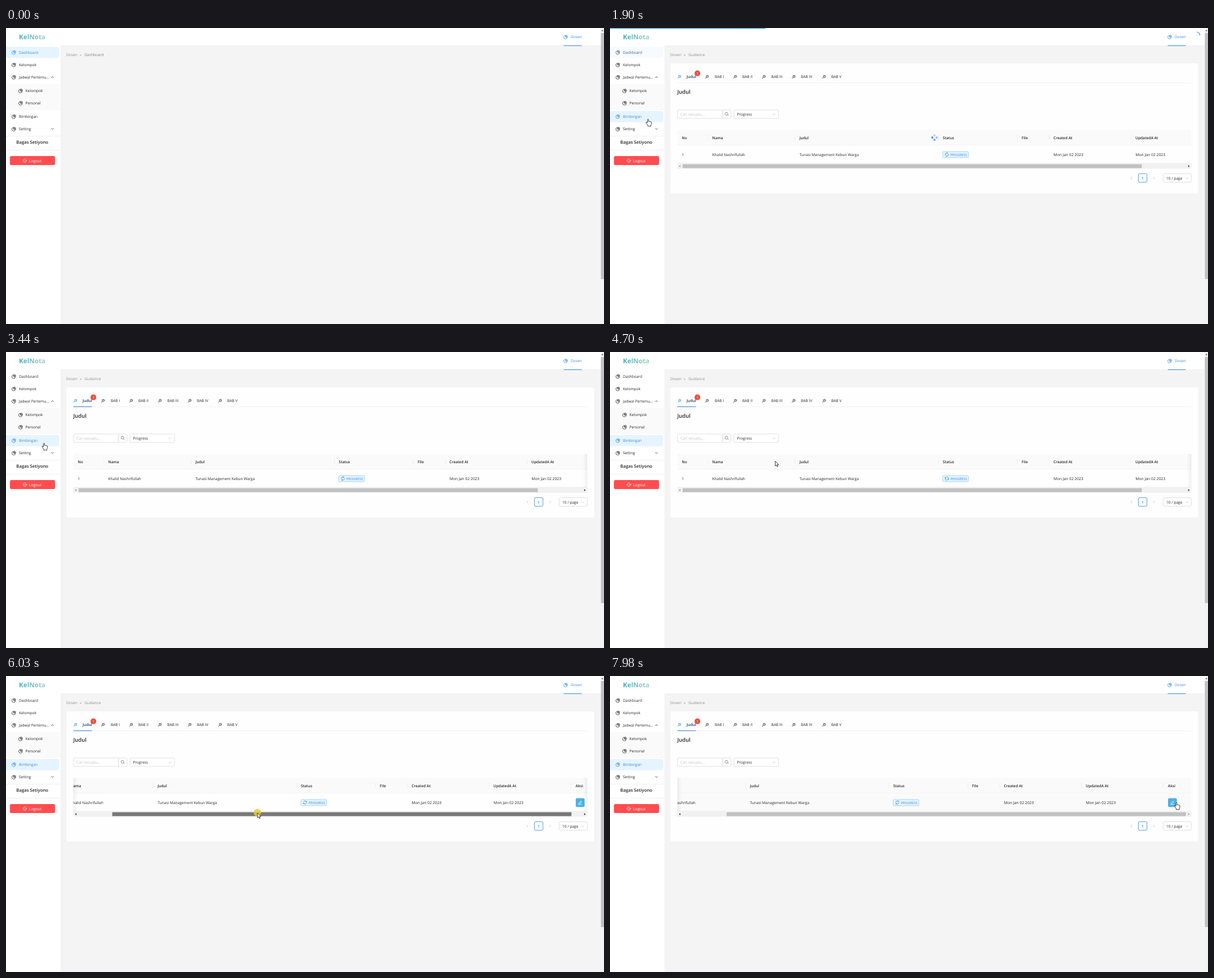
These frames come from a looping animation (1062 by 527 pixels, 8 s). An HTML page with a canvas:

```html
<!DOCTYPE html>
<html lang="id">
<head>
<meta charset="utf-8">
<title>Dashboard</title>
<style>
  html, body { margin: 0; width: 100%; height: 100%; overflow: hidden; background: #fff; }
  canvas { display: block; }
</style>
</head>
<body>
<canvas id="stage" width="1062" height="527"></canvas>
<script>
const c = document.getElementById('stage').getContext('2d');
const LOOP = 8000, MAX_SCROLL = 88, SCROLL_RATIO = 1.126, DRAG_X = 387;
const INK = '#252525', BLUE = '#2f8ae8', GREY = '#8a8e8c', EDGE = '#d9d9d9', PALE = '#e6f4ff';
const PAGE_AT = 1690, TABLE_AT = 1760, DRAG_AT = 5380, DROP_AT = 6430;

// Pointer stops: time, x, y
const stops = [
  [520, 883, 463], [1270, 66, 172], [1340, 67.5, 162], [3900, 67.5, 162],
  [4600, 293.5, 194], [4720, 293.5, 194], [4980, 335, 149], [5290, 387, 243.5],
  [5400, 387, 243.5], [6030, 446.5, 243.5], [6160, 468, 243.5], [6410, 674, 243.5],
  [7060, 1051.5, 208.5], [7120, 1051.5, 208.5], [7250, 1057, 209], [7450, 1057, 213],
  [7850, 1006, 225], [8000, 1006, 225]
];
const arrowShape = new Path2D('M0 0V8.6L2 6.8L3.4 10L4.8 9.4L3.4 6.4H6Z');
const handShape = new Path2D('M0 0c-1 0-1 1-1 1.5v5l-1-1c-1-1-2 0-1.3 1l2.8 4.5v1.5h5.5v-1.5' +
  'l1-2.5v-3c0-1-1-1.2-1.5-.7c-.3-1-1.5-1-1.8-.4c-.4-.8-1.4-.8-1.7-.2v-3c0-.7 0-1.2-1-1.2z');

const clamp = (v, a = 0, b = 1) => Math.min(b, Math.max(a, v));
const ramp = (t, a, b) => clamp((t - a) / (b - a));

function pointer(t) {
  let i = 0;
  while (i < stops.length - 2 && t >= stops[i + 1][0]) i++;
  const [t0, x0, y0] = stops[i], [t1, x1, y1] = stops[i + 1], k = ramp(t, t0, t1);
  return { x: x0 + (x1 - x0) * k, y: y0 + (y1 - y0) * k };
}

function text(s, x, y, color = INK, size = 6.6, weight = 400, align = 'left') {
  c.font = `${weight} ${size}px "Open Sans", "Noto Sans", sans-serif`;
  c.textAlign = align;
  c.fillStyle = color;
  c.fillText(s, x, y + size * .36);
}
function rect(x, y, w, h, color) {
  c.fillStyle = color;
  c.fillRect(x, y, w, h);
}
function box(x, y, w, h, r, fill, edge) {
  c.beginPath();
  c.roundRect(x, y, w, h, r);
  if (fill) { c.fillStyle = fill; c.fill(); }
  if (edge) { c.strokeStyle = edge; c.lineWidth = .8; c.stroke(); }
}
// Strokes an icon path around a centre point
function icon(x, y, d, color, width = .8, turn = 0) {
  c.save();
  c.translate(x, y);
  c.rotate(turn);
  c.strokeStyle = color;
  c.lineWidth = width;
  c.stroke(new Path2D(d));
  c.restore();
}
const pie = (x, y, color = INK) =>
  icon(x, y, 'M-.4-2.9A3.2 3.2 0 1 0 2.9.4H-.4ZM.7-3.4V-.7H3.4A2.8 2.8 0 0 0 .7-3.4Z', color);
const tool = (x, y, color) =>
  icon(x, y, 'M2.8-.8A2 2 0 1 0-1.2-.8A2 2 0 1 0 2.8-.8M-.6.6L-2.9 2.9M.4-.8H1.4', color, .9);
const lens = (x, y) =>
  icon(x, y, 'M2-.7A2.5 2.5 0 1 0-3-.7A2.5 2.5 0 1 0 2-.7M1.3 1.1L3.4 3.2', '#777');
const chevron = (x, y, dir, color = INK) =>
  icon(x, y, `M-2.2 ${-dir}L0 ${dir * 1.2}L2.2 ${-dir}`, color);
const angle = (x, y, dir) =>
  icon(x, y, `M${-dir} -2.2L${dir * 1.2} 0L${-dir} 2.2`, '#b5b5b5', .7);

function triangle(x, y, dir, color) {
  c.fillStyle = color;
  c.beginPath();
  c.moveTo(x + dir * 1.5, y);
  c.lineTo(x - dir, y - 2);
  c.lineTo(x - dir, y + 2);
  c.fill();
}

// A menu row whose selected look has strength k
function menuRow(label, y, k = 0) {
  c.globalAlpha = k;
  box(-4, y - 10, 98.5, 20, 4, PALE);
  for (const [color, alpha] of [[INK, 1 - k], [BLUE, k]]) {
    c.globalAlpha = alpha;
    pie(14, y, color);
    text(label, 23, y, color);
  }
  c.globalAlpha = 1;
}

function sidebar(t) {
  rect(0, 0, 96.5, 527, '#fff');
  const g = c.createLinearGradient(23, 0, 70, 0);
  g.addColorStop(0, '#45aab4');
  g.addColorStop(1, '#a5d3cb');
  text('KelNota', 23, 16, g, 11.7, 700);
  const open = t >= PAGE_AT;
  menuRow('Dashboard', 43.5, open ? 1 - ramp(t, PAGE_AT, 2010) : 1);
  menuRow('Kelompok', 65.7);
  menuRow('Jadwal Pertemu...', 87.7);
  chevron(82.5, 87.7, -1);
  rect(0, 99.5, 96.5, 46.5, '#fafafa');
  [['Kelompok', 112], ['Personal', 133.8]].forEach(([s, y]) => {
    pie(26, y);
    text(s, 34.5, y);
  });
  menuRow('Bimbingan', 157.7, ramp(t, PAGE_AT, 1860));
  menuRow('Setting', 180);
  chevron(82.5, 179.5, 1);
  rect(0, 192, 96.5, .8, '#ebebeb');
  rect(0, 217, 96.5, .8, '#ebebeb');
  text('Bagas Setiyono', 46.7, 203, INK, 7.75, 600, 'center');
  box(7, 228, 80, 16, 2.5, '#ff4d4f');
  icon(33.7, 236.2, 'M2-2.3A3.1 3.1 0 1 0 2 2.3M-.8 0H3.6M2.4-1.1L3.6 0L2.4 1.1', '#fff');
  text('Logout', 41, 236.2, '#fff', 6.8);
}

function pageFrame(p) {
  rect(0, 0, 1062, 527, '#fff');
  rect(96.5, 31.5, 960, 496, '#f4f4f4');
  rect(96.5, 31, 960, .7, '#eeeeee');
  pie(994, 16, BLUE);
  text('Dosen', 1003, 16, BLUE);
  rect(990.5, 31, 32, 1, BLUE);
  rect(1056, 0, 6, 527, '#f1f1f1');
  rect(1056.5, 9, 5.5, 438, p && p.x > 1055 ? '#a8a8a8' : '#c1c1c1');
  c.fillStyle = '#606060';
  c.beginPath();
  c.moveTo(1059.2, 3);
  c.lineTo(1061, 5.5);
  c.lineTo(1057.4, 5.5);
  c.fill();
}

function tabs(t) {
  rect(119.5, 97, 913, .8, '#efefef');
  tool(123, 87, BLUE);
  text('Judul', 136, 87, '#1c3b5e', 6.9, 600);
  [['I', 172, 186], ['II', 222, 235], ['III', 273, 286.5], ['IV', 326, 339], ['V', 380, 393]]
    .forEach(([n, ix, x]) => { tool(ix, 87, '#3a2c2c'); text('BAB ' + n, x, 87); });
  if (t > 1960) rect(119.5, 97, 33, 1, '#2f7fd6');
  c.fillStyle = '#e5533f';
  c.beginPath();
  c.arc(155.2, 80.7, 5.1, 0, 7);
  c.fill();
  text('1', 155.2, 80.7, '#fff', 6, 400, 'center');
  text('Judul', 119.5, 113.5, INK, 9.5, 600);
}

function filters() {
  box(119.9, 145.9, 80, 15, 2.5, '#fff', EDGE);
  text('Cari sesuatu...', 125, 153.7, '#c2c2c2');
  box(199.9, 145.9, 15, 15, [0, 2.5, 2.5, 0], '#fff', EDGE);
  lens(207.3, 153.4);
  box(220.2, 145.9, 79.2, 15, 2.5, '#fff', EDGE);
  text('Progress', 225.5, 153.7);
  chevron(291.2, 153.6, 1, '#bbb');
}

function tag(t) {
  box(590.9, 219.9, 45.7, 11, 2, PALE, '#91caff');
  icon(598.2, 225.3, 'M-2.8-.3A2.8 2.8 0 0 1 2.4-1.5M2.6-3V-1.3H.9M2.8.3A2.8 2.8 0 0 1-2.4 1.5M-2.6 3V1.3H-.9',
    BLUE, .8, t / 1000 * Math.PI * 2);
  text('PROGRESS', 604.5, 225.4, BLUE, 5.9);
}

function edgeShadow(x, dir) {
  const g = c.createLinearGradient(x, 0, x + dir * 8, 0);
  g.addColorStop(0, 'rgba(0,0,0,.06)');
  g.addColorStop(1, 'rgba(0,0,0,0)');
  rect(Math.min(x, x + dir * 8), 181.5, 8, 59.5, g);
}

function table(t, p, scroll) {
  const over = p.y > 208 && p.y < 241 && p.x > 119 && p.x < 1056;
  c.save();
  c.beginPath();
  c.rect(119.5, 181, 913, 60);
  c.clip();
  rect(119.5, 181.5, 913, 27, '#fafafa');
  if (over) rect(119.5, 208.5, 913, 32.5, '#fafafa');
  rect(119.5, 208, 913, .8, '#f0f0f0');
  rect(119.5, 240.3, 913, .7, '#f0f0f0');
  c.translate(-scroll, 0);
  [173.5, 328, 583, 723, 780, 925, 1070].forEach(x => rect(x, 190, .8, 10, '#ececec'));
  [['No', 127.5], ['Nama', 181.5], ['Judul', 336.5], ['Status', 591], ['File', 731],
    ['Created At', 787.5], ['UpdatedA At', 933], ['Aksi', 1078.8]]
    .forEach(([s, x]) => text(s, x, 195.2, INK, 6.6, 600));
  text('1', 127.5, 225.2);
  text('Khalid Nashrifullah', 181.5, 225.2);
  text('Tunasi Management Kebun Warga', 336.5, 225.2);
  tag(t);
  text('Mon Jan 02 2023', 787.8, 225.2, INK, 6.8);
  text('Mon Jan 02 2023', 933.3, 225.2, INK, 6.8);
  box(1079, 217.5, 15.7, 15.7, 2.5, '#4fb0e2');
  icon(1086.8, 225.2, 'M-2.4 1.4L1.2-2.4L2.5-1.1L-1.1 2.4H-2.4ZM-3.2 3.5H3.2', '#fff');
  c.restore();

  if (t > 1960 && scroll < MAX_SCROLL) edgeShadow(1032.5, -1);
  if (scroll > 0) edgeShadow(119.5, 1);
  rect(119.5, 241, 913, 9.5, '#f1f1f1');
  const held = t >= DRAG_AT && t < DROP_AT;
  rect(129 + scroll / SCROLL_RATIO, 242.5, 815.5, 7, held ? '#787878' : '#c1c1c1');
  triangle(124, 246, -1, scroll > 0 ? '#333' : '#999');
  triangle(1027.8, 246, 1, scroll < MAX_SCROLL ? '#333' : '#999');

  angle(926, 267.3, -1);
  box(938.4, 259.4, 15.2, 15.2, 2.5, '#fff', '#2f7fd6');
  text('1', 946, 267.3, '#2f7fd6', 6.6, 600, 'center');
  angle(966, 267.3, 1);
  box(982.4, 259.4, 50, 15.2, 2.5, '#fff', EDGE);
  text('10 / page', 988, 267.3);
  chevron(1024.5, 267.2, 1, '#bbb');
}

function dots(t) {
  c.save();
  c.translate(576.3, 195);
  c.rotate((t - 1900) / 1200 * Math.PI * 2);
  c.globalAlpha = 1 - ramp(t, 1880, 2050);
  [.35, .55, .75, .9].forEach(a => {
    c.fillStyle = `rgba(47,128,214,${a})`;
    c.beginPath();
    c.arc(0, -3.9, 2, 0, 7);
    c.fill();
    c.rotate(Math.PI / 2);
  });
  c.restore();
}

function loader(t) {
  if (t < 1410 || t > 2600) return;
  const k = t < 2150 ? .08 * ramp(t, 1410, 1500) + .18 * ramp(t, 1550, 1890)
    : .26 + .74 * ramp(t, 2150, 2380);
  c.globalAlpha = 1 - ramp(t, 2380, 2600);
  rect(0, 0, 1062 * k, 1.2, '#2299dd');
  icon(1043, 12, 'M-1-4.4A4.5 4.5 0 0 1 4.4 1', '#2299dd', 1.1, (t - 1900) / 400 * Math.PI * 2);
  c.globalAlpha = 1;
}

function cursor(t, p) {
  const pressed = (t >= DRAG_AT && t < DROP_AT) || (t >= 1400 && t < 1520);
  if (pressed) {
    c.fillStyle = 'rgba(232,205,50,.82)';
    c.beginPath();
    c.arc(p.x - .3, p.y - .3, 6.6, 0, 7);
    c.fill();
  }
  const link = p.x < 94 || (p.x > 991 && p.x < 1007 && p.y > 217 && p.y < 234);
  const shape = link ? handShape : arrowShape;
  c.save();
  c.translate(p.x, p.y + .3);
  c.fillStyle = '#fff';
  c.strokeStyle = '#111';
  c.lineWidth = .8;
  c.fill(shape);
  c.stroke(shape);
  c.restore();
}

function draw(t) {
  const p = t >= 520 ? pointer(t) : null;
  const scroll = t >= DRAG_AT ? clamp((p.x - DRAG_X) * SCROLL_RATIO, 0, MAX_SCROLL) : 0;
  const open = t >= PAGE_AT;
  pageFrame(p);
  sidebar(t);
  text('Dosen', 107, 47.7, GREY);
  text('»', 131, 47.4, GREY);
  text(open ? 'Guidance' : 'Dashboard', 139.3, 47.7, open ? GREY : '#7b827e');
  if (open) {
    box(107.3, 63, 937.5, 231.5, 3.5, '#fefefe');
    tabs(t);
    filters();
    if (t >= TABLE_AT) table(t, p, scroll);
    if (t < 2050) dots(t);
  }
  loader(t);
  if (p) cursor(t, p);
}

c.textRendering = 'geometricPrecision';
const start = performance.now();
function tick() {
  draw((performance.now() - start) % LOOP);
  requestAnimationFrame(tick);
}
tick();
</script>
</body>
</html>
```
